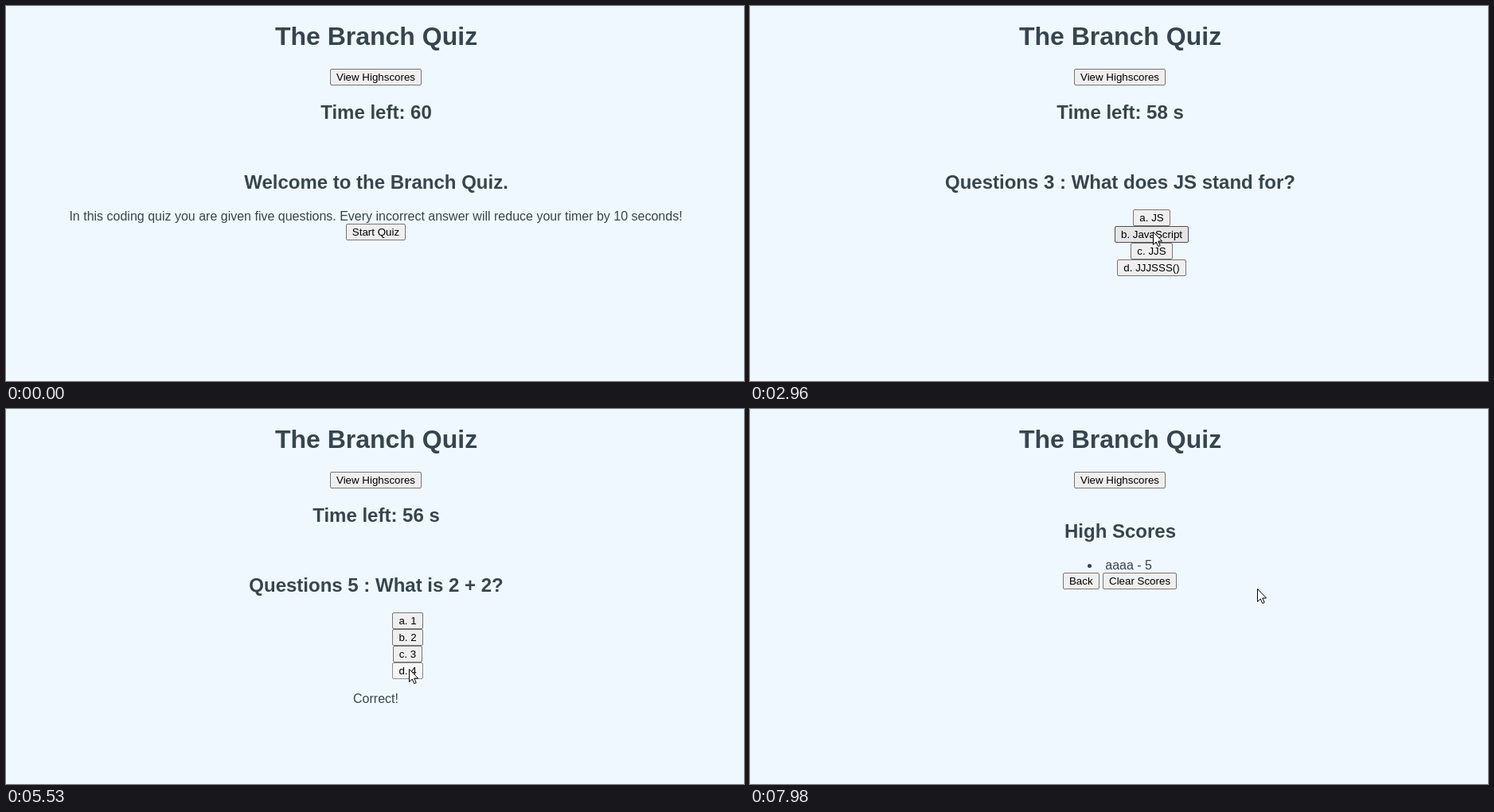
An HTML page that plays this animation: 927x472 px, repeating every 8 s.

```html
<!DOCTYPE html>
<html lang="en">
<head>
<meta charset="utf-8">
<title>The Branch Quiz</title>
<style>
html, body { margin: 0; width: 100%; height: 100%; overflow: hidden; }
body {
  position: relative; background: #f0f8ff; color: #36454f; cursor: none;
  font: 16px/17px "Liberation Sans", Arial, sans-serif;
}
h1, h2, p, .row { position: absolute; left: 0; width: 929px; margin: 0; text-align: center; white-space: nowrap; }
h1, h2 { width: 930px; }
h1 { font-size: 32px; line-height: 36px; }
h2 { font-size: 24px; line-height: 27px; }
.row { display: flex; justify-content: center; gap: 4.45px; }
.answers .row { left: 40px; }
.row span { margin-top: 1px; }
.btn, .field {
  box-sizing: border-box; flex: none; height: 21px; padding: 2px 7px 0;
  border: 1px solid #767676; border-radius: 2px;
  background: #efefef; color: #000; font-size: 13.333px; line-height: 15px;
}
.btn.hover { background: #e5e5e5; border-color: #4f4f4f; }
.btn.active { background: #f5f5f5; border-color: #8d8d8d; }
.field { display: flex; width: 177px; padding: 2px 2px 0; background: #fff; }
.field.focus { border: 2px solid #101010; padding: 1px 1px 0; border-radius: 3px; }
#caret { width: 1px; height: 15px; background: #000; }
.dot { position: absolute; left: 424px; top: 195px; width: 5px; height: 5px; border-radius: 50%; background: #36454f; }
#entry { left: 446.3px; width: auto; }
svg { position: absolute; left: 0; top: 0; width: 14px; height: 21px; overflow: visible; }
[hidden] { display: none !important; }
</style>
</head>
<body>
<h1 style="top:20px">The Branch Quiz</h1>
<div class="row" style="top:79px"><div class="btn">View Highscores</div></div>
<h2 id="timer" style="top:120px"></h2>
<div id="screens"></div>
<p id="feedback" style="top:356px">Correct!</p>
<svg id="cursor">
  <path id="arrow" d="M.5 .5V16.5L4.2 13L6.8 18.6L9.2 17.5L6.7 12H11.6Z" fill="#fff" stroke="#000"/>
  <path id="beam" d="M-3 -8.5H-1M1 -8.5H3M0 -8V8M-3 8.5H-1M1 8.5H3" fill="none" stroke="#000"/>
</svg>
<script>
const LOOP = 8000, ENTER = 30, FOCUS = 6360, TYPE = 7300, KEY_GAP = 93, BLINK = 530;
const $ = id => document.getElementById(id);

const heading = (top, text) => `<h2 style="top:${top}px">${text}</h2>`;
const para = (top, text) => `<p style="top:${top}px">${text}</p>`;
const row = (top, inner) => `<div class="row" style="top:${top}px">${inner}</div>`;
const button = text => `<div class="btn">${text}</div>`;
const question = (n, text, answers) =>
  heading(208, `Questions ${n} : ${text}`) + '<div class="answers">' +
  answers.map((a, i) => row(256 + 21 * i, button('abcd'[i] + '. ' + a))).join('') + '</div>';

const screens = [
  { at: 0, html: heading(208, 'Welcome to the Branch Quiz.') +
    para(256, 'In this coding quiz you are given five questions. Every incorrect answer will reduce your timer by 10 seconds!') +
    row(274, button('Start Quiz')) },
  { at: 740, html: question(1, 'What does HTML stand for?', ['HTML', 'HTMLL', 'The HyperText Markup Language', 'HTMLLL']) },
  { at: 1580, html: question(2, 'What does CSS stand for?', ['CSS', 'CSSS', 'Cascading Style Sheets', 'CCSS']) },
  { at: 2490, html: question(3, 'What does JS stand for?', ['JS', 'JavaScript', 'JJS', 'JJJSSS()']) },
  { at: 3150, html: question(4, 'What is 1 + 1?', [0, 1, 2, 3]) },
  { at: 4860, html: question(5, 'What is 2 + 2?', [1, 2, 3, 4]) },
  { at: 5560, html: heading(140, 'Finished!') + para(188, 'Your final score is :5') +
    row(222, '<span>Enter your name...</span><div class="field" id="field"><div id="typed"></div><div id="caret"></div></div>' + button('Submit')) },
  { at: 7900, html: heading(140, 'High Scores') + '<div class="dot"></div><p id="entry" style="top:188px">aaaa - 5</p>' +
    row(206, button('Back') + button('Clear Scores')) }
];
const clicks = screens.slice(1).map(s => s.at);
const start = clicks[0], answers = clicks.slice(1, 5), finish = clicks[5];

// Pointer stops: time, x, y
const stops = [
  [ENTER, 478, 451], [800, 467, 287], [910, 491, 296], [1600, 494, 306],
  [2090, 492, 296], [2490, 495, 304], [2960, 506, 284], [3550, 556, 302],
  [3870, 508, 294], [4330, 508, 294], [4580, 501, 306], [5100, 506, 327],
  [5530, 506, 327], [6090, 555, 274], [6340, 530, 235], [6570, 530, 235],
  [7330, 637, 226]
];

$('screens').innerHTML = screens.map(s => `<section>${s.html}</section>`).join('');
const sections = [...document.querySelectorAll('section')];
const buttons = [...document.querySelectorAll('.btn')];

function pointer(t) {
  const i = stops.findIndex(s => s[0] > t);
  if (i < 1) return stops.at(i).slice(1);
  const [t0, x0, y0] = stops[i - 1], [t1, x1, y1] = stops[i];
  const u = (t - t0) / (t1 - t0), e = u * u * (3 - 2 * u);
  return [x0 + (x1 - x0) * e, y0 + (y1 - y0) * e];
}

function inside(el, x, y) {
  const r = el.getBoundingClientRect();
  return x >= r.left && x < r.right && y >= r.top && y < r.bottom;
}

// Each answer shows the note and hides it a second later, whatever came between.
function noteShown(t) {
  const latest = delay => Math.max(0, ...answers.map(a => a + delay).filter(a => a <= t));
  return t < finish && latest(0) > latest(1000);
}

function draw(t) {
  const current = screens.filter(s => s.at <= t).length - 1;
  sections.forEach((s, i) => s.hidden = i !== current);

  const elapsed = Math.max(0, Math.floor((t - start) / 1000));
  $('timer').textContent = 'Time left: ' + (60 - elapsed) + (elapsed ? ' s' : '');
  $('timer').hidden = t >= finish;
  $('feedback').hidden = !noteShown(t);

  const typed = Math.min(4, Math.max(0, Math.floor((t - TYPE) / KEY_GAP) + 1));
  const lastInput = typed ? TYPE + (typed - 1) * KEY_GAP : FOCUS;
  $('typed').textContent = 'a'.repeat(typed);
  $('field').classList.toggle('focus', t >= FOCUS);
  $('caret').hidden = t < FOCUS || Math.floor((t - lastInput) / BLINK) % 2 === 1;

  const [x, y] = pointer(t);
  const visible = t >= ENTER;
  const pressed = clicks.some(c => t >= c - 70 && t < c);
  for (const b of buttons) {
    const over = visible && inside(b, x, y);
    b.classList.toggle('hover', over);
    b.classList.toggle('active', over && pressed);
  }
  const overText = inside($('field'), x, y);
  $('cursor').style.display = visible ? '' : 'none';
  $('cursor').style.transform = `translate(${Math.round(x)}px, ${Math.round(y)}px)`;
  $('arrow').style.display = overText ? 'none' : '';
  $('beam').style.display = overText ? '' : 'none';
}

const begin = performance.now();
function tick() {
  draw((performance.now() - begin) % LOOP);
  requestAnimationFrame(tick);
}
tick();
</script>
</body>
</html>
```
